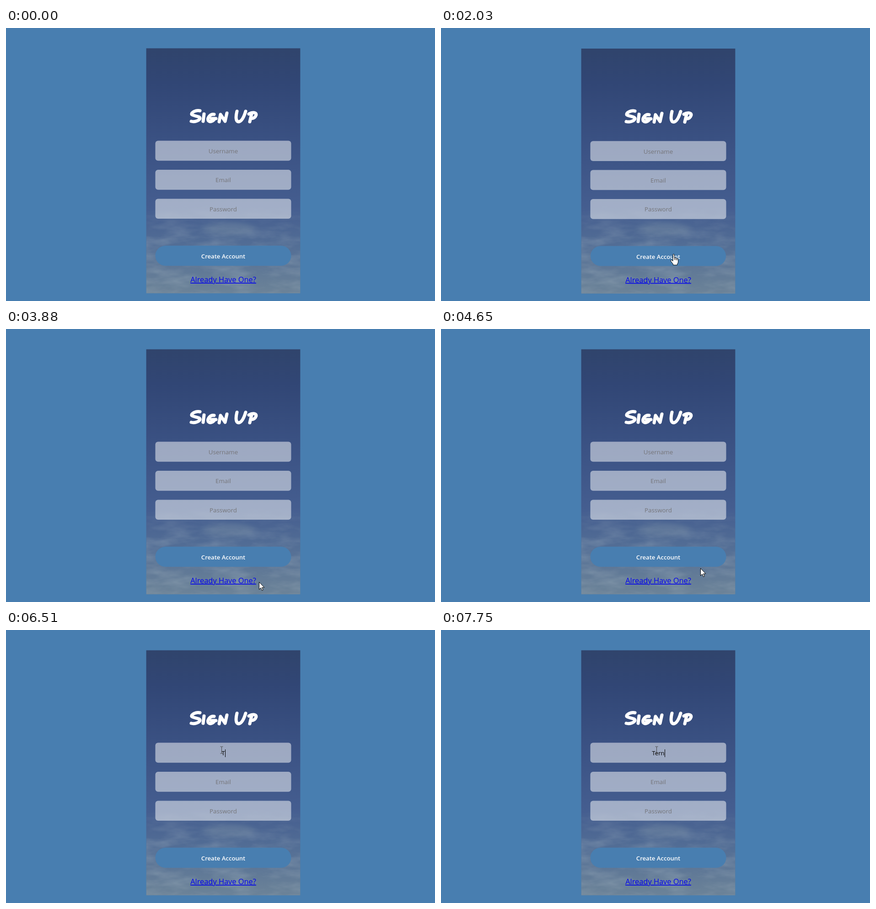
These frames come from a looping animation (938 by 597 pixels, 8 s). An HTML page:

```html
<!DOCTYPE html>
<html lang="en">
<head>
<meta charset="utf-8">
<title>Sign up form</title>
<style>
html, body { margin: 0; width: 100%; height: 100%; overflow: hidden; background: #487eb0 }
svg { display: block }
text { font: 13.33px "Open Sans", "Noto Sans", sans-serif }
.mid { text-anchor: middle }
.hint { fill: #757579 }
.title { fill: none; stroke: #fff; stroke-width: 7; stroke-linecap: round; stroke-linejoin: round }
.link { font-size: 16.4px; fill: #0000ee; text-decoration: underline }
.button { font-size: 13.1px; font-weight: 600; fill: #fff }
.popup .typed { font: bold 15.5px "Liberation Sans", sans-serif; fill: #0a5fc0 }
.popup .num { font: 13.33px "Liberation Mono", monospace }
.popup .word { font: 16px "Noto Sans CJK SC", "Noto Sans CJK", sans-serif }
.chev { fill: none; stroke: #ff6a3a; stroke-width: 2 }
</style>
</head>
<body>
<svg width="938" height="597" viewBox="0 0 938 597">
  <defs>
    <linearGradient id="sky" x2="0" y2="1">
      <stop offset="0" stop-color="#30446c"/>
      <stop offset=".14" stop-color="#314675"/>
      <stop offset=".4" stop-color="#3b5284"/>
      <stop offset=".66" stop-color="#455e90"/>
      <stop offset=".8" stop-color="#526d95"/>
      <stop offset="1" stop-color="#6c8398"/>
    </linearGradient>
    <linearGradient id="fade" x2="0" y2="1">
      <stop offset="0" stop-color="#000"/>
      <stop offset=".4" stop-color="#fff"/>
    </linearGradient>
    <mask id="low"><rect x="307" y="385" width="336" height="195" fill="url(#fade)"/></mask>
    <filter id="wisps" x="0" y="0" width="1" height="1">
      <feTurbulence type="fractalNoise" baseFrequency=".015 .05" numOctaves="4" seed="8"/>
      <feColorMatrix values="0 0 0 0 .5  0 0 0 0 .58  0 0 0 0 .62  1.2 0 0 0 -.42"/>
    </filter>
    <filter id="soft" x="-.5" y="-1" width="2" height="3"><feGaussianBlur stdDeviation="9 5"/></filter>
  </defs>

  <g id="form">
    <rect x="306.6" y="44.4" width="336.8" height="535.8" fill="url(#sky)"/>
    <ellipse cx="488" cy="440" rx="55" ry="15" filter="url(#soft)" fill="#8095a8" opacity=".35"/>
    <g mask="url(#low)"><rect x="307" y="385" width="336" height="195" filter="url(#wisps)" opacity=".4"/></g>
    <g class="title" role="img" aria-label="Sign Up">
      <path d="M424 181C416 179 405 184 406 189C409 193 425 192 424 198C422 203 412 206 405 204"/>
      <path d="M433 188L431 204"/>
      <path d="M455 189C447 187 440 196 442 202C446 207 453 204 456 199M449 198L459 198"/>
      <path d="M466 205L469 189L479 204L483 186"/>
      <path d="M505 182C502 194 502 205 509 205C516 204 521 192 524 182"/>
      <path d="M537 188L533 205M531 188C540 183 548 185 547 190C545 196 541 198 536 198"/>
    </g>
    <g id="fields" fill="#fff" fill-opacity=".5"></g>
    <text class="mid hint" id="user" x="475" y="274">Username</text>
    <text class="mid hint" x="475" y="337.4">Email</text>
    <text class="mid hint" x="475" y="400.8">Password</text>
    <g id="button">
      <rect x="326.5" y="476" width="297" height="44" rx="22" fill="#487eb0"/>
      <text class="mid button" x="475" y="504">Create Account</text>
    </g>
    <text class="mid link" x="475" y="556">Already Have One?</text>
  </g>

  <text class="mid" id="name" x="475" y="274"></text>
  <rect id="under" y="276" height="1"/>
  <rect id="caret" y="261" width="1" height="17"/>
  <g id="popup" class="popup"></g>

  <g id="pointer">
    <path id="arrow" d="M0 0V16l3.7-3.5 2.5 5.8 2.4-1-2.4-5.6h5z" fill="#fff" stroke="#000"/>
    <g id="hand" stroke="#000">
      <path fill="#fff" d="M-1.5 1.5q0-1.5 1.5-1.5t1.5 1.5V8l1-.6q2-.2 2.3 1.4q2-.6 2.6 1q2.6-.4 2.6 2v5q0 3-2 5v2h-9v-2l-5-6.5q-.8-2 .8-2.6q1.5 0 3.7 2.6z"/>
      <path fill="none" d="M2 8v4.5M4.8 9v4M7.4 10v3.5"/>
    </g>
    <path id="beam" d="M-3-7.5h2.5l.5.5.5-.5h2.5M0-7V7M-3 7.5h2.5l.5-.5.5.5h2.5" fill="none" stroke="#444"/>
  </g>
</svg>
<script>
const $ = id => document.getElementById(id);
const LOOP = 8000, ENTER = 160, CLICK = 5500, BLINK = 480, SHRINK = 500;
const NAME = "Tern";

// pointer moves: start, end, x, y; it rests in between
const MOVES = [
  [160, 870, 472, 490], [1110, 1500, 515, 475], [1500, 1640, 538, 377], [1790, 2030, 508, 494],
  [2030, 2490, 520, 503], [2780, 2980, 540, 519], [2980, 3180, 575, 577], [3490, 3560, 579, 555],
  [3810, 3880, 554, 553], [3880, 3950, 497, 551], [3950, 4020, 517, 553], [4130, 4350, 579, 555],
  [4580, 5200, 475, 275], [5280, CLICK, 471, 262]
];
// time, letters, candidate words
const TYPING = [
  [6510, 1],
  [6910, 2, ["额", "饿", "の", "(⊙o⊙)⋯", "鄂"]],
  [7060, 3, ["儿童", "耳朵", "而且", "二月", "儿子"]],
  [7380, 4, ["二年", "而你", "儿女", "耳内", "而能"]],
  [7680, 4]
];

function pointAt(t) {
  let x = 784, y = 588;
  for (const [from, to, nextX, nextY] of MOVES) {
    const p = Math.min(1, Math.max(0, (t - from) / (to - from)));
    x += (nextX - x) * p;
    y += (nextY - y) * p;
  }
  return [x, y];
}

const within = (x, y, l, t, w, h) => x >= l && x <= l + w && y >= t && y <= t + h;
const fieldTop = i => 246.6 + 63.4 * i;
const onButton = (x, y) => within(x, y, 326, 476, 298, 44);
const onLink = (x, y) => within(x, y, 403, 541, 144, 21);
const onField = (x, y) => [0, 1, 2].some(i => within(x, y, 326, fieldTop(i), 298, 44));

function shapeAt(x, y) {
  if (onButton(x, y) || onLink(x, y)) return "hand";
  return onField(x, y) ? "beam" : "arrow";
}

// times at which the pointer enters or leaves the button
const switches = [];
for (let t = 0, over = false; t < LOOP; t += 2) {
  if (onButton(...pointAt(t)) !== over) {
    over = !over;
    switches.push(t);
  }
}

// cubic-bezier(.25, .1, .25, 1)
function ease(p) {
  if (p >= 1) return 1;
  let lo = 0, hi = 1, u;
  for (let i = 0; i < 20; i++) {
    u = (lo + hi) / 2;
    const x = .75 * u * (1 - u) + u ** 3;
    if (x < p) lo = u; else hi = u;
  }
  return .3 * u * (1 - u) ** 2 + 3 * u * u * (1 - u) + u ** 3;
}

function hoverAt(t) {
  let value = 0;
  switches.forEach((start, i) => {
    if (t < start) return;
    const goal = 1 - i % 2, end = Math.min(t, switches[i + 1] ?? LOOP);
    value += (goal - value) * ease((end - start) / SHRINK);
  });
  return value;
}

function popup(left, typed, words) {
  const end = left + 9 + typed.length * 9;
  let x = left + 10;
  const items = words.map((word, i) => {
    const spots = [];
    let at = x + 16;
    for (const c of word) {
      spots.push(at);
      at += "(o)".includes(c) ? 8 : 16;
    }
    const item = `<g fill="${i ? "#0a7fd8" : "#f02020"}"><text class="num" x="${x}" y="323">${i + 1}.</text>` +
      `<text class="word" x="${spots.join(" ")}" y="324">${word}</text></g>`;
    x = at + 12.6;
    return item;
  });
  const right = Math.round(x + 55);
  return `<rect x="${left + .5}" y="278.5" width="${right - left - 1}" height="53" fill="#fff" stroke="#55606c"/>
    <path d="M${left + 1} 304.5H${right - 31}" stroke="#d0d0d0"/>
    <rect x="${right - 30}" y="279" width="29" height="29" fill="#f8ab90"/>
    <text class="typed" x="${left + 9}" y="297">${typed}</text>
    <path d="M${end + 1.5} 283v18" stroke="#f02020"/>${items.join("")}
    <path class="chev" d="M${right - 44} 314l-4 4 4 4" style="stroke:#c8c8c8"/>
    <path class="chev" d="M${right - 35} 314l4 4-4 4M${right - 19} 316l4 4 4-4"/>`;
}

const show = (id, on) => $(id).style.display = on ? "" : "none";

function draw(t) {
  // the card sits slightly lower while the button is resizing
  const resizing = switches.some(s => t >= s && t < s + SHRINK);
  $("form").setAttribute("transform", `translate(0 ${resizing ? .6 : 0})`);
  const scale = 1 - .05 * hoverAt(t);
  $("button").setAttribute("transform", `translate(475 498) scale(${scale}) translate(-475 -498)`);

  const [x, y] = pointAt(t).map(Math.round), shape = shapeAt(x, y);
  $("pointer").setAttribute("transform", `translate(${x + .5} ${y + .5})`);
  for (const id of ["arrow", "hand", "beam"]) show(id, id === shape);
  show("pointer", t >= ENTER);

  const [, count = 0, words] = TYPING.findLast(k => t >= k[0]) || [];
  const name = $("name");
  name.textContent = NAME.slice(0, count);
  show("user", !count);
  const width = count ? name.getComputedTextLength() : 0, end = Math.round(475 + width / 2);
  $("caret").setAttribute("x", end);
  show("caret", count || t >= CLICK && t < CLICK + BLINK);
  show("under", words);
  if (words) {
    const part = name.getSubStringLength(1, count - 1);
    $("under").setAttribute("x", 475 + width / 2 - part);
    $("under").setAttribute("width", part);
  }
  $("popup").innerHTML = words ? popup(end + 1, NAME.slice(1, count), words) : "";
}

$("fields").innerHTML = [0, 1, 2].map(i =>
  `<rect x="326.5" y="${fieldTop(i)}" width="297" height="43.7" rx="6"/>`).join("");

const start = performance.now();
function tick() {
  draw((performance.now() - start) % LOOP);
  requestAnimationFrame(tick);
}
tick();
</script>
</body>
</html>
```
